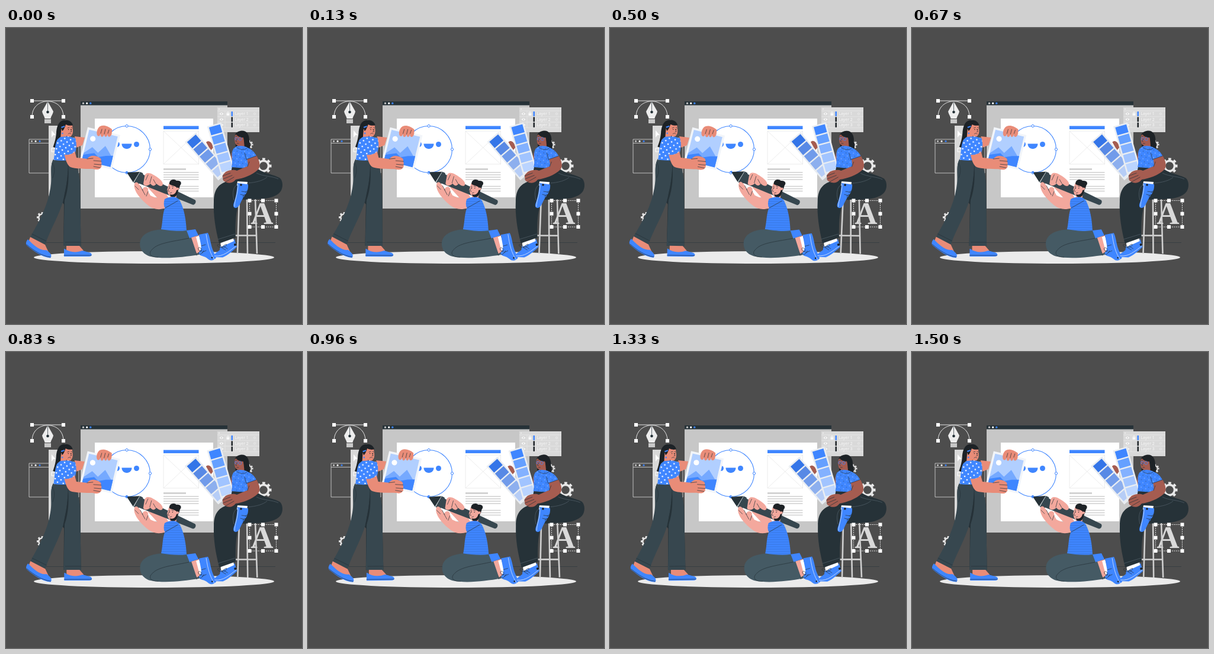
Recreate the animation shown at these times as an HTML page. Size 500 by 500 pixels, loop 1540 ms.

```html
<!DOCTYPE html>
<html lang="en">
<head>
<meta charset="utf-8">
<title>Design team</title>
<style>
html, body { margin: 0; width: 100%; height: 100%; overflow: hidden; background: #4d4d4d; }
svg { display: block; width: 100%; height: 100%; }
.blue { fill: #3f86ff; }
.dark { fill: #263238; }
.ink { fill: #1d2226; }
.cloth { fill: #37474f; }
.rose { fill: #e98c78; }
.pink { fill: #f3a89d; }
.brown { fill: #a55c50; }
.gray { fill: #c7c7c7; }
.pale { fill: #d9d9d9; }
.white { fill: #fff; }
.line { fill: none; stroke: #263238; stroke-width: .7; stroke-linecap: round; stroke-linejoin: round; }
.wire { fill: none; stroke: #e6e6e6; stroke-width: 1; }
.paper { fill: none; stroke: #e4e4e4; stroke-width: .7; }
</style>
</head>
<body>
<svg viewBox="0 0 500 500">
<defs>
  <pattern id="dots" width="10" height="10" patternUnits="userSpaceOnUse" patternTransform="translate(82 186) rotate(12)">
    <rect width="10" height="10" class="blue"/><circle cx="2" cy="2" r="1.300" class="white"/><circle cx="7" cy="7" r="1.300" class="white"/>
  </pattern>
  <pattern id="specks" width="8" height="8" patternUnits="userSpaceOnUse" patternTransform="rotate(20)">
    <rect width="8" height="8" class="blue"/><circle cx="2" cy="2" r=".6" class="white"/><circle cx="6" cy="6" r=".6" class="dark"/>
  </pattern>
  <pattern id="stripes" width="4" height="4" patternUnits="userSpaceOnUse">
    <rect width="4" height="4" class="blue"/><path d="M0 1H4" stroke="#3069c9" stroke-width=".6"/>
  </pattern>
</defs>

<path d="M42 362.500H455" stroke="#303a3f" stroke-width=".7"/>
<ellipse cx="250" cy="387.500" rx="203" ry="10.500" fill="#ebebeb"/>

<!-- browser -->
<path class="gray" d="M126 124H374V305H126Z"/>
<path class="dark" d="M126 124H374V130.500H126Z"/>
<circle class="gray" cx="130.500" cy="127.200" r="1.600"/><circle class="white" cx="136.700" cy="127.200" r="1.600"/><circle class="blue" cx="142.800" cy="127.200" r="1.600"/>
<path class="white" d="M150 153H350V286H150Z"/>
<path class="blue" d="M266 165.500H325.500V171H266Z"/>
<path class="paper" d="M266 174H325.500V230H266ZL325.500 230M325.500 174L266 230"/>
<path fill="#d3d3d3" d="M266 237H304V240H266Z"/>
<path stroke="#d0d0d0" stroke-width="1.500" d="M266 244H325.500M266 248H325.500M266 252H325.500M266 256H325.500M266 267.500H325.500M266 271.500H325.500M266 275.500H325.500"/>
<circle cx="204" cy="205" r="39.500" fill="none" stroke="#3f86ff" stroke-width="1.100"/>
<path class="blue" d="M195.500 195.500H212.500C212.500 207 195.500 207 195.500 195.500Z"/>
<circle class="blue" cx="187.500" cy="196.500" r="4.500"/><circle class="blue" cx="220.500" cy="196.500" r="4.500"/>
<g id="handles" fill="#fff" stroke="#3f86ff"></g>

<!-- curve tool -->
<path class="wire" d="M44 123H97M44 150C44 115 97 115 97 150"/>
<path fill="#ededed" d="M70.500 124L80 141C79 146 76 149 75.500 153H65.500C65 149 62 146 61 141Z"/>
<path class="gray" d="M65 154H76V161H65Z"/>
<path class="line" d="M70.500 125V140"/><circle class="dark" cx="70.500" cy="142" r="2.300"/>
<g id="knots" fill="#fff"></g>

<!-- side window and toolbar -->
<path class="wire" stroke-opacity=".75" d="M39 188H123V245H39ZM39 194.500H123"/>
<circle class="gray" cx="43.500" cy="191.300" r="1.500"/><circle class="white" cx="50" cy="191.300" r="1.500"/><circle class="blue" cx="57" cy="191.300" r="1.500"/>
<path class="pale" d="M72 165H91V290H72Z"/>
<path class="white" d="M77 173L84 181L80 181L77 185Z"/>
<path fill="none" stroke="#fff" d="M77 203H83V209H77Z"/>

<g id="gears" fill="none" stroke="#e8e8e8"></g>

<!-- layers -->
<path class="pale" d="M357 134H428V176H357Z"/>
<path stroke="#e9e9e9" stroke-width=".7" d="M357 140H428M357 149.700H428M357 159H428M357 168.500H428M370 140V168.500"/>
<circle class="white" cx="360" cy="137" r=".8"/>
<g id="layers" fill="#f8f8f8" font-family="'Noto Sans', sans-serif" font-size="6.800"></g>

<!-- type box -->
<path class="wire" stroke-dasharray="2 1.500" d="M411.500 291.500H456.500V336H411.500Z"/>
<text x="432.500" y="331" text-anchor="middle" font-family="'Liberation Serif', serif" font-weight="700" font-size="53" fill="#d9d9d9">A</text>

<!-- woman with picture -->
<g data-pivot="113 271">
  <path class="ink" d="M99 155.500C88 156 85.500 169 85 177C84 188 82 194 79.500 201C88 205 98 199 102 188L107 166Z"/>
  <path class="rose" d="M116 183L133 185L129 198L119 202Z"/>
  <path class="rose" d="M94 162C102 158 111 161 112 165C113 171 114 178 111 181C109 185 104 184 102 182L102 189L92 188Z"/>
  <path class="ink" d="M91 164C93 154 109 152 113 164C108 166 103 164 101 163C99 169 97 173 95 174Z"/>
  <path class="line" d="M104 169L107 168M110 168L112 169M109 171L111 175L109 175.500M105 179C107 177 109 178 110 179"/>
  <circle class="ink" cx="105.500" cy="171.500" r=".7"/><circle class="ink" cx="110.500" cy="171.500" r=".7"/>
  <path class="blue" d="M93 167L99 165V167L94 169Z"/><circle class="blue" cx="95.500" cy="178" r="1.300"/>
  <path class="dark" d="M80 222H108C118 228 124 245 125 263L126.500 368H97L98 298L76 272C79 253 73 235 80 222Z"/>
  <path class="cloth" d="M102 222H109C119 229 124 244 125 263L126.500 368H97L99 290Z"/>
  <path class="cloth" d="M80 222H105C105 248 102 274 97 291C89 318 74 342 66 366L41 353C57 325 70 301 75 271C79 250 73 234 80 222Z"/>
  <path class="dark" d="M105 236C107 258 104 280 97 296L99 280C103 264 104 250 105 236Z"/>
  <path class="line" d="M105 231C106 247 102 272 97 291M79 228C84 239 81 247 79 253M100 362H126M44 348L68 360"/>
  <path class="rose" d="M41 353L66 366L73 381C60 384 45 373 38 361ZM102 368H124L131 376L121 382H102Z"/>
  <path class="blue" d="M37 357C33 361 33 366 36 368C47 377 60 387 75 388.500C79 384 74 379 68 375C57 377 45 365 38 358ZM98 373V386H140C147 386 146 380 140 379L129 376C119 380 107 379 99 373Z"/>
  <path class="line" d="M35 366C47 376 60 385 75 387M98 384H144"/>
  <path fill="url(#dots)" d="M92 184L105 183L117 186C120 194 119 206 116 214L108 222C99 225 90 224 80.500 223C83 210 82 196 87 188Z"/>
  <g transform="translate(138 167.500) rotate(13.500)">
    <path fill="#f2f5f9" d="M0 0H56.500V60H0Z"/>
    <path fill="#b1cfff" d="M3.500 3.500H53V56.500H3.500Z"/>
    <circle class="white" cx="13" cy="17" r="4.600"/>
    <path fill="#75a9ff" d="M3.500 44L15.500 31L27 38L36.500 24L53 41V56H3.500Z"/>
    <path class="blue" d="M3.500 47L21 40L29 45L41 40L53 37V56.500H3.500Z"/>
  </g>
  <path class="rose" d="M154 181C152 176 155 168 159 166C165 163 173 166 179 171C179 176 179 181 176 183C173 185 171 182 172 178C171 185 166 186 166 179C165 185 159 186 160 178C159 183 156 184 154 181Z"/>
  <path class="line" d="M160 178L162 171M166 179L168 171M172 178L174 172"/>
  <path class="rose" d="M97 207L116 207L119 219L137 221C142 215 149 214 158 219C162 221 160 224 161 226C162 229 161 231 161 232C162 235 160 236 159 237C157 240 151 239 146 238C132 238 117 238 109 235C103 232 100 221 97 207Z"/>
  <path class="line" d="M161 225L148 224M161 231L149 230M159 236L148 234M137 221L147 220"/>
  <path fill="url(#dots)" d="M92 187C97 186 106 189 111 196L116 209C110 214 104 215 97 214C95 205 91 196 92 187Z"/>
</g>

<!-- man with pen -->
<g data-pivot="279 317">
  <path class="pink" d="M246 262L272 282L277 292L262 294L240 270Z"/>
  <g transform="translate(204 244) rotate(24)">
    <path class="cloth" d="M25-10L27-8L124-4.500C128-4 128 4 124 4.500L27 8.500L25 11H18L20-10Z"/>
    <path class="dark" d="M0 0L20-10L17 11Z"/>
    <path d="M20-10L17 11" fill="none" stroke="#b5bfc4" stroke-width=".8"/>
    <path d="M76-3H92" stroke="#647078"/>
  </g>
  <circle class="blue" cx="204" cy="244" r="1.800"/>
  <path class="pink" d="M234 251C235 243 243 244 249 248C256 252 265 258 265 264C264 269 258 267 254 263C251 268 247 267 244 263C239 268 233 267 232 263Z"/>
  <path class="line" d="M236 257L240 248M243 262L246 251M253 263L249 256"/>
  <path class="pink" d="M275 263C281 258 291 263 292 269L288 283L287 290L276 289L277 283C272 281 274 276 272 274Z"/>
  <path class="ink" d="M276 264C275 256 284 254 288 258C295 257 298 262 294 266C293 270 292 274 290 275L288 269C284 266 280 266 276 264ZM291 273C290 281 287 286 282 286C279 286 277 283 277 281C282 283 287 280 288 274Z"/>
  <circle class="pink" cx="290" cy="271.500" r="2.100"/>
  <path class="line" d="M275 268L277 267M280 267L283 268M276 270L273 275L276 276M277 279L280 278"/>
  <circle class="ink" cx="276.300" cy="270" r=".7"/><circle class="ink" cx="281.500" cy="270.500" r=".7"/>
  <path fill="#455a64" d="M305 341C317 344 324 355 326 383C299 387 268 391 244 386C230 382 224 371 227 359C232 345 249 341 265 340Z"/>
  <path fill="#455a64" d="M262 341L305 342C307 350 301 357 292 359C272 362 252 369 244 381C238 387 225 374 227 360C231 345 249 342 262 341Z"/>
  <path class="line" d="M309 355C288 360 257 362 247 374C239 381 245 388 257 387M318 355L322 384"/>
  <path fill="url(#stripes)" d="M270 288C279 284 289 284 294 292C301 306 304 323 305 342C291 344 274 342 262 340C265 327 264 316 268 305Z"/>
  <path class="pink" d="M217 263C220 256 227 265 230 273C234 265 242 269 240 276L244 283C254 288 262 289 270 289L269 304C259 308 249 306 242 301C229 291 214 275 217 263Z"/>
  <path class="line" d="M230 273L235 282M218 267L224 273M240 276L237 284M227 267L231 274"/>
  <path fill="url(#stripes)" d="M268 289C276 284 284 287 290 292L270 306C266 302 266 295 268 289Z"/>
  <path class="line" d="M269 304L290 292"/>
  <path class="blue" d="M305 342L320 340L325 350L310 355Z"/>
  <path class="pink" d="M313 354L326 350L331 375L322 381Z"/>
  <path class="white" d="M321 353L326 351L333 373L327 376Z"/>
  <path class="blue" d="M326 349L341 346C345 354 345 363 349 374L355 388C351 393 345 394 341 390C334 384 329 386 326 382C324 379 332 375 329 365Z"/>
  <path fill="none" stroke="#d9e6ff" stroke-width=".8" d="M338 348C341 367 344 379 352 391"/>
  <path class="line" d="M330 368L337 366M331 374C322 364 323 380 331 376C320 378 328 389 334 376M331 379L338 376"/>
  <circle class="ink" cx="348" cy="388" r="1.300"/>
</g>

<!-- woman on stool -->
<g data-pivot="385 273">
  <path fill="none" stroke="#cfcfcf" stroke-width="2.600" d="M394 286L391 381M407 286L408 381M421 286L424 381M378 290L376 380M380 350.500H423"/>
  <path class="ink" d="M398 173.500C407 173 411 181 411 189C411 196 415 201 409 207L388 203L387 180C389 176 393 174 398 173.500Z"/>
  <path class="brown" d="M387 181C389 176 397 176 401 180L403 203H390L391 198C386 197 387 192 386 189Z"/>
  <path class="ink" d="M387 181C390 174 402 173 406 182V198C403 195 402 189 401 185C396 185 391 183 389 180Z"/>
  <g fill="none" stroke="#3f86ff" stroke-width=".8"><circle cx="389" cy="187" r="2.300"/><circle cx="395.500" cy="187.500" r="2.600"/></g>
  <path class="line" d="M388 183L390 183M394 183L397 184M391 187L388 191L390 192M390 195L393 195"/>
  <path class="brown" d="M338 193C342 189 348 192 350 202L346 207Z"/>
  <path class="brown" d="M381 211L388 208L386 240L377 239Z"/>
  <g id="swatches"></g>
  <path class="blue" d="M362 368L386 357L390 370C382 377 375 384 366 387.500L351 387C349 382 357 379 361 375Z"/>
  <path class="white" d="M362 358L384 355L385 360L363 370Z"/>
  <path d="M352 385C367 387 378 376 389 368" fill="none" stroke="#dce8ff" stroke-width=".8"/>
  <path class="line" d="M364 371L371 375M368 369L374 373M365 370C354 359 355 373 365 370C378 358 372 373 365 370"/>
  <circle class="ink" cx="387" cy="366" r="2"/>
  <path class="dark" d="M382 234H421C430 245 452 247 462 253C469 258 469 274 460 280C446 291 420 289 397 290C389 301 387 324 388 354L360 364C354 339 350 318 351 293C351 272 360 262 377 258Z"/>
  <path fill="none" stroke="#53616a" stroke-width=".7" d="M423 245C435 251 450 250 460 255M407 262C424 261 435 257 441 252M394 263C383 266 382 279 385 291M358 357L387 348"/>
  <path class="white" d="M391 259L408 260L407 267L390 266Z"/>
  <path class="blue" d="M391 262L409 264C410 274 405 281 400 288C396 294 394 304 388 304C384 304 383 300 385 295C389 284 390 275 391 262Z"/>
  <path d="M392 264C392 280 386 291 386 302" fill="none" stroke="#dce8ff" stroke-width=".8"/>
  <path class="line" d="M398 276L406 277M396 281L403 283M404 278C414 267 411 286 403 281C409 292 399 294 401 282"/>
  <circle class="ink" cx="397" cy="265" r="1.800"/>
  <path fill="url(#specks)" d="M389 200C397 197 410 201 415 207L423 218L420 235C407 238 394 236 381 235C384 223 379 212 384 204Z"/>
  <path class="brown" d="M407 218L423 215C428 224 431 233 426 239C416 249 400 254 388 256C383 263 375 263 369 259C365 257 367 254 366 252C365 249 367 247 371 243C378 239 386 239 390 241L409 233Z"/>
  <path class="line" d="M366 250L379 245M367 255L382 249M371 260L385 252M408 234L411 226"/>
  <path fill="url(#specks)" d="M403 204C413 201 420 210 423 216L406 222C401 217 399 209 403 204Z"/>
  <path class="line" d="M406 222L423 216M406 222L403 211M390 202C397 207 403 206 407 203"/>
</g>
<g id="corners" fill="#fff"></g>
</svg>
<script>
const PERIOD = 1540;
const add = (id, markup) => document.getElementById(id).innerHTML += markup;
const square = (id, x, y) => add(id, `<rect x="${x - 3}" y="${y - 3}" width="6" height="6"/>`);

for (const [x, y] of [[204, 165.5], [243.5, 205], [204, 244.5]])
  add('handles', `<circle cx="${x}" cy="${y}" r="2.1"/>`);

for (const x of [44, 97]) for (const y of [123, 150]) square('knots', x, y);

for (const x of [411.5, 434, 456.5]) for (const y of [291.5, 313.7, 336])
  if (x !== 434 || y !== 313.7) square('corners', x, y);

// Gear: a ring plus a dashed ring of eight teeth
for (const [x, y, r] of [[61, 320, 9], [410, 197, 7.5], [435, 233, 13.5]]) {
  const tooth = Math.PI * r * .87 / 8;
  add('gears', `<g transform="translate(${x} ${y}) rotate(-11)" stroke-width="${r * .27}">
    <circle r="${r * .64}"/><circle r="${r * .87}" stroke-dasharray="${tooth}"/></g>`);
}

for (let i = 0; i < 3; i++) {
  const y = 145 + i * 9.4;
  add('layers', `<path d="M360.500 ${y}Q364 ${y - 4} 367.500 ${y}Q364 ${y + 4} 360.500 ${y}"/>
    <circle class="gray" cx="364" cy="${y}" r="1"/>
    ${i ? '' : `<path d="M372.500 ${y - 1}H377.500V${y + 3}H372.500Z"/><path d="M373.500 ${y}V${y - 3}H376.500V${y}" fill="none" stroke="#fff" stroke-width=".8"/>`}
    <path class="${i ? 'ink' : 'blue'}" d="M380.500 ${y - 4}H383V${y + 4}H380.500Z"/>
    <text x="386.500" y="${y + 2.4}">Layer ${i + 1}</text>
    <circle cx="420" cy="${y}" r="1.600" fill="none" stroke="#eee" stroke-width=".7"/>`);
}

function swatch(x, y, angle, colors) {
  const cells = colors.map((c, i) => `<rect x="-9.700" y="${2.5 + i * 16.2}" width="19.400" height="13.800" fill="${c}"/>`);
  add('swatches', `<g transform="translate(${x} ${y}) rotate(${angle})">
    <rect x="-12.300" width="24.600" height="86" fill="#e9edf2"/>${cells.join('')}</g>`);
}
swatch(311.5, 184.5, -41, ['#3475e8', '#5889e5', '#719bea', '#8dafee', '#b6cdf6']);
swatch(351.5, 163, -16, ['#3f86ff', '#65a0ff', '#83b1ff', '#a1c4ff', '#bad4ff']);

const people = document.querySelectorAll('[data-pivot]');

// Linear sway in degrees: 0, 1, -1, 0
function frame() {
  const phase = performance.now() / PERIOD % 1;
  const angle = 1 - Math.abs(4 * ((phase + .25) % 1) - 2);
  for (const person of people)
    person.setAttribute('transform', `rotate(${angle} ${person.dataset.pivot})`);
  requestAnimationFrame(frame);
}
frame();
</script>
</body>
</html>
```
